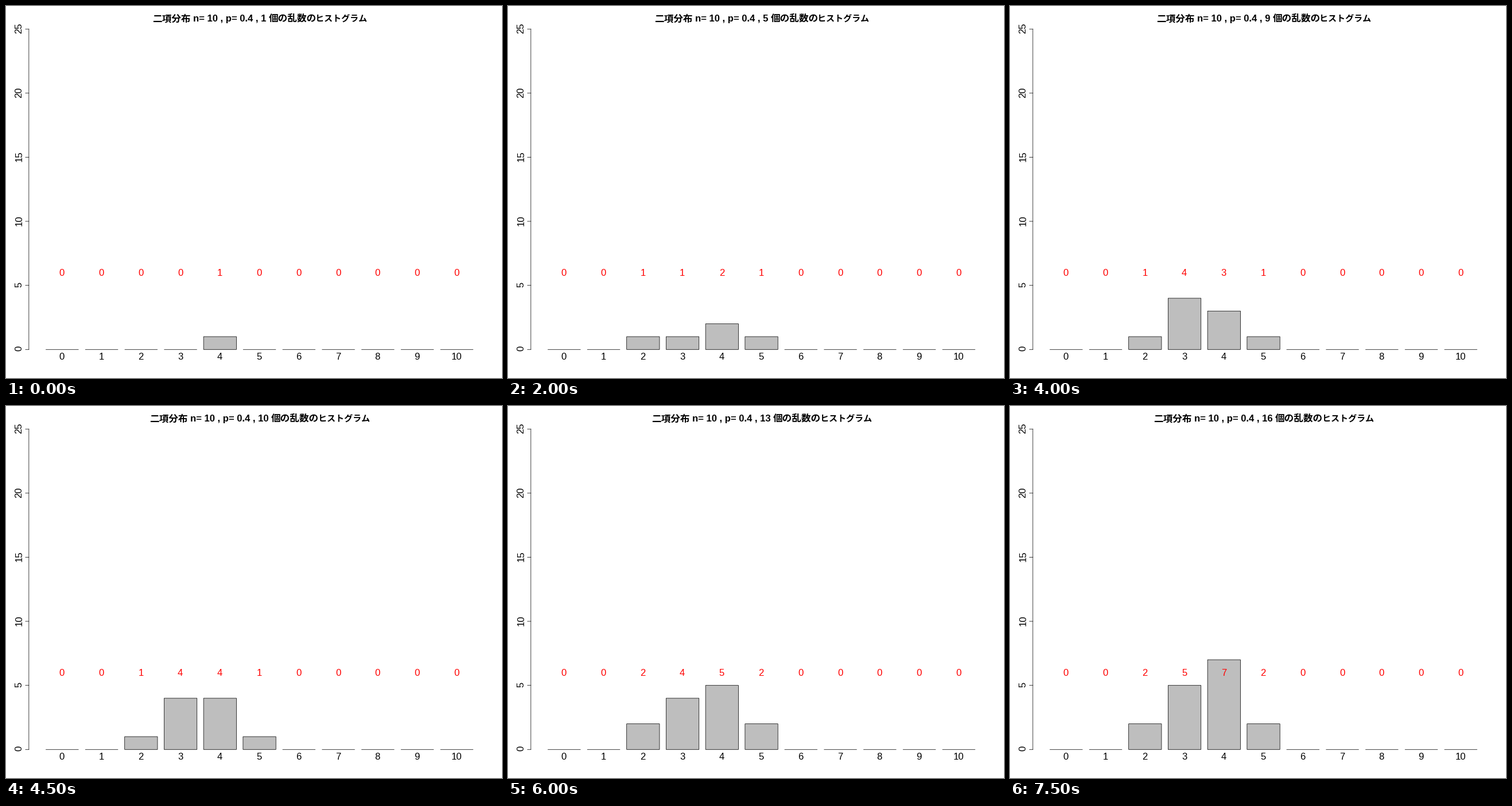
Animation of 864 by 648 pixels, one loop 8000 ms. Source, as a matplotlib script:

```python
import matplotlib.pyplot as plt
from matplotlib.animation import FuncAnimation
from matplotlib.patches import Rectangle

W, H, DPI = 864, 648, 72
SIZE = 16.6              # text size in pixels
DIGIT = 0.556 * SIZE     # advance of one digit
LINE = 1.2 * SIZE        # height of one margin line
LEFT, RIGHT = 2 * LINE, W - LINE
BASE, UNIT = 598.3, 22.325
BAR = (RIGHT - LEFT) / 14.04
BAR_X0 = 69.2
LW = 0.75

# Successive draws from the binomial distribution
DRAWS = [4, 3, 4, 5, 2, 3, 3, 3, 4, 4, 5, 4, 2, 4, 3, 4]

plt.rcParams["font.family"] = ["Liberation Sans", "Noto Sans CJK JP"]

fig = plt.figure(figsize=(W / DPI, H / DPI), dpi=DPI, facecolor="white")
ax = fig.add_axes([0, 0, 1, 1])
ax.set_xlim(0, W)
ax.set_ylim(H, 0)
ax.axis("off")


def y_of(value):
    return BASE - UNIT * value


def label(x, y, s, size=SIZE, **kw):
    return ax.text(x, y, s, fontsize=size, va="baseline", **kw)


def centred(x, y, number, **kw):
    s = str(number)
    return label(x - DIGIT * len(s) / 2 - 0.4, y, s, **kw)


def line(xs, ys):
    ax.plot(xs, ys, color="black", lw=LW, snap=False)


# Vertical axis
line([LEFT, LEFT], [y_of(0), y_of(25)])
for v in range(0, 26, 5):
    line([LEFT - 0.3 * LINE, LEFT], [y_of(v), y_of(v)])
    label(27.4, y_of(v) - 1.6, str(v), rotation=90, ha="center",
          rotation_mode="anchor")

# Bars, category labels and red counters
bars, counters = [], []
for k in range(11):
    x = BAR_X0 + 1.2 * BAR * k
    bars.append(ax.add_patch(Rectangle(
        (x, BASE), BAR, 0, facecolor="#bebebe", edgecolor="black",
        lw=LW, snap=False)))
    centred(x + BAR / 2, 616, k)
    counters.append(centred(x + BAR / 2, 470, 0, color="red"))

# Title pieces: those before the sample size move left as it widens,
# those after it move right
TITLE_Y = 27
head_x = (255.2, 325.8)
tail_x = (457.6, 539.0)
head = [label(x, TITLE_Y, s, weight="bold")
        for x, s in zip(head_x, ("二項分布", ""))]
tail = [label(x, TITLE_Y, s, size, weight="bold")
        for x, s, size in zip(tail_x, ("個の乱数の", "ヒストグラム"),
                              (SIZE, 15))]


def update(i):
    seen = DRAWS[:i + 1]
    for k, (bar, counter) in enumerate(zip(bars, counters)):
        n = seen.count(k)
        bar.set_height(-UNIT * n)
        counter.set_text(str(n))
    total = str(len(seen))
    shift = DIGIT * (len(total) - 1) / 2
    head[1].set_text(f"n= 10 , p= 0.4 , {total}")
    for x, t in zip(head_x, head):
        t.set_x(x - shift)
    for x, t in zip(tail_x, tail):
        t.set_x(x + shift)
    return bars + counters + head + tail


anim = FuncAnimation(fig, update, frames=len(DRAWS), interval=500,
                     repeat=True, repeat_delay=0, blit=False)
plt.show()
```
